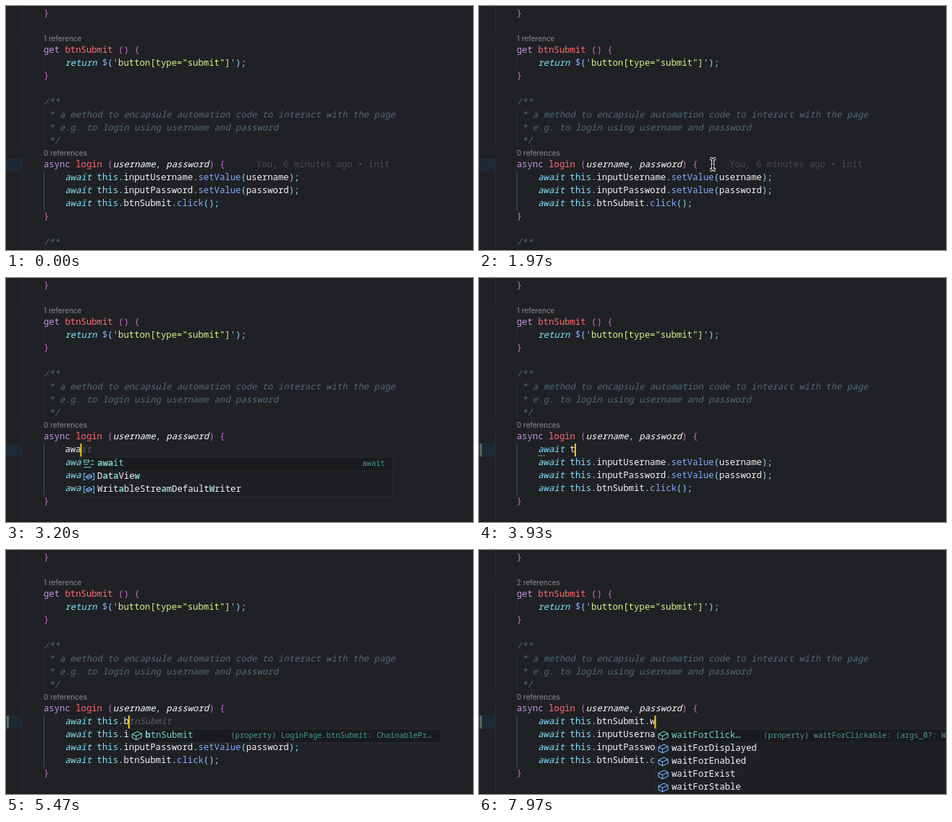
Animation of 645 by 339 pixels, one loop 8 s. Source, as an HTML page with a canvas:

```html
<!DOCTYPE html>
<html lang="en">
<head>
<meta charset="utf-8">
<title>Code editor</title>
<style>
  html, body { margin: 0; width: 100%; height: 100%; overflow: hidden; background: #202124; }
  canvas { display: block; width: 645px; height: 339px; }
</style>
</head>
<body>
<canvas id="stage"></canvas>
<script>
const W = 645, H = 339, LOOP = 8000;
const SIZE = 12.27, CHAR = SIZE * 0.6, LEFT = 52, LINE = 18;
const MONO = '"Noto Sans Mono", monospace';
const TEAL = '#7fcfd0', BLUE = '#75b5ff';

const canvas = document.getElementById('stage');
const ctx = canvas.getContext('2d');
const ratio = window.devicePixelRatio || 1;
canvas.width = W * ratio;
canvas.height = H * ratio;

// Token styles: colour and font style
const STYLES = {
  k: ['#c792ea', ''],
  n: ['#ff6b78', ''],
  b: ['#d06fd0', ''],
  c: ['#89ddff', ''],
  a: ['#80e4ff', 'italic'],
  f: ['#82aaff', ''],
  s: ['#d8f58c', ''],
  w: ['#f4f5f7', ''],
  p: ['#ffffff', 'italic'],
  m: ['#526b79', 'italic'],
  g: ['#5c6066', 'italic'],
  y: ['#494b4f', ''],
};

// Content of the new line from each moment on
const TYPED = [
  [2750, ''], [2900, 'a'], [3010, 'aw'], [3110, 'awa'], [3360, 'awai'],
  [3470, 'await'], [3620, 'await '], [3880, 'await t'], [3960, 'await th'],
  [4030, 'await thi'], [4080, 'await this'], [4130, 'await this.'],
  [4975, 'await this.b'], [5620, 'await this.btnSubmit'],
  [7050, 'await this.btnSubmit.'], [7750, 'await this.btnSubmit.w'],
];

const GHOSTS = {
  'awa': 'it', 'awai': 't', 'await this.': 'btnSubmit', 'await this.b': 'tnSubmit',
};

// Square brackets mark emphasised letters
const PROPERTY = '(property) LoginPage.btnSubmit: ChainablePr…';
const POPUPS = {
  'awa': { icons: 'kvv', detail: 'await', at: 388,
    items: ['[awa]it', 'D[a]t[a]Vie[w]', 'Writ[a]bleStre[a]mDefault[W]riter'] },
  'awai': { icons: 'k', detail: 'await', at: 388, items: ['[awai]t'] },
  'await this.': { icons: 'ooooo', detail: PROPERTY, at: 140,
    items: ['btnSubmit', 'inputPassword', 'inputUsername', 'login', 'open'] },
  'await this.b': { icons: 'o', detail: PROPERTY, at: 140, items: ['[b]tnSubmit'] },
  'await this.btnSubmit.': { icons: 'ooooo', at: 149,
    detail: '(property) addCommand: (name: string, func: any)',
    items: ['addCommand', 'addValue', 'clearValue', 'click', 'custom$'] },
  'await this.btnSubmit.w': { icons: 'ooooo', at: 149,
    detail: '(property) waitForClickable: (args_0?: WaitForOptions)',
    items: ['waitForClick…', 'waitForDisplayed', 'waitForEnabled', 'waitForExist', 'waitForStable'] },
};

const HEADER = [
  [10, 'b:}'],
  [61, 'k:get ', 'n:btnSubmit ', 'b:() {'],
  [79, 'a:    return ', 'f:$', "c:('", 's:button[type="submit"]', "c:');"],
  [97, 'b:}'],
  [133, 'm:/**'],
  [151, 'm: * a method to encapsule automation code to interact with the page'],
  [169, 'm: * e.g. to login using username and password'],
  [187, 'm: */'],
  [220, 'k:async ', 'n:login ', 'b:(', 'p:username', 'c:, ', 'p:password', 'b:) {'],
];
const BODY = [
  'await this.inputUsername.setValue(username);',
  'await this.inputPassword.setValue(password);',
  'await this.btnSubmit.click();',
];

function rect(color, x, y, w, h) {
  ctx.fillStyle = color;
  ctx.fillRect(x, y, w, h);
}

function text(string, x, middle, color, style = '', size = SIZE, weight = 500, family = MONO) {
  ctx.font = `${style} ${weight} ${size}px ${family}`;
  ctx.fillStyle = color;
  ctx.fillText(string, x, middle + size * 0.365);
}

function tokens(x, middle, parts) {
  for (const part of parts) {
    const [color, style] = STYLES[part[0]], string = part.slice(2);
    text(string, x, middle, color, style);
    x += string.length * CHAR;
  }
}

function highlight(code) {
  const words = code.match(/\w+|\W/g) || [];
  return words.map((word, i) => {
    if (word === 'await') return 'a:' + word;
    if (word === 'this' || /\W/.test(word)) return 'c:' + word;
    return (words[i + 1] === '(' ? 'f:' : 'w:') + word;
  });
}

function stroke(color, width, points, close) {
  ctx.strokeStyle = color;
  ctx.lineWidth = width;
  ctx.beginPath();
  points.forEach(([x, y]) => ctx.lineTo(x, y));
  if (close) ctx.closePath();
  ctx.stroke();
}

function icon(kind, x, y, color) {
  const line = (points, close) => stroke(color, 1.1, points.map(([a, b]) => [x + a, y + b]), close);
  if (kind === 'o') {
    line([[-6.5, -2], [1, -6], [6.5, -3], [6.5, 2.5], [-1, 6], [-6.5, 3]], true);
    line([[-6.5, -2], [-1, 0.5], [6.5, -3]]);
    line([[-1, 0.5], [-1, 6]]);
  } else if (kind === 'v') {
    for (const side of [-1, 1]) {
      line([[4.5 * side, -4.5], [7 * side, -4.5], [7 * side, 4.5], [4.5 * side, 4.5]]);
    }
    line([[-4, -0.5], [1, -3], [4, -1], [4, 1], [-1, 3.2], [-4, 1.5]], true);
    line([[-4, -0.5], [-1, 0.8], [4, -1]]);
  } else {
    line([[-7, -5], [0, -5], [0, -2], [-7, -2]], true);
    line([[2.5, -4], [7, -4]]);
    line([[-7, 1], [-1, 1]]);
    line([[2, 1], [7, 1]]);
    line([[-7, 5], [3, 5]]);
  }
}

function popup({ items, icons, detail, at }, x) {
  const top = 248.5, width = 431, height = items.length * LINE + 2;
  rect('#2c2e32', x, top, width, height);
  rect('#1f2023', x + 1, top + 1, width - 2, height - 2);
  rect('#191b1d', x + 1, top + 1, width - 2, LINE - 1);
  items.forEach((item, row) => {
    const y = 257 + row * LINE, color = row ? '#f4f5f7' : TEAL;
    icon(icons[row], x + 10.5, y + 1, row ? BLUE : TEAL);
    let column = x + 22;
    item.split(/[[\]]/).forEach((piece, i) => {
      const strong = i % 2;
      text(piece, column, y, strong ? TEAL : color, '', SIZE, strong ? 700 : 500);
      column += piece.length * CHAR;
    });
  });
  text(detail, x + at, 257, '#4f9899', '', 10.5, 400);
}

function pointer(t) {
  if (t < 300 || t >= 2750) return;
  const k = 1 - (1 - Math.min(1, (t - 300) / 500)) ** 3;
  const x = 440 - 117 * k, y = 345 - 125 * k;
  for (const [color, width] of [['#f2f2f2', 4], ['#111', 1.5]]) {
    for (const side of [-1, 1]) {
      stroke(color, width, [[x + 4 * side, y - 8], [x + 1.5 * side, y - 7.5], [x, y - 6],
        [x, y + 6], [x + 1.5 * side, y + 7.5], [x + 4 * side, y + 8]]);
    }
    stroke(color, width, [[x - 2.5, y + 2.5], [x + 2.5, y + 2.5]]);
  }
}

function draw(t) {
  const step = TYPED.findLast(([time]) => t >= time);
  const typed = step ? step[1] : '';
  const shift = step ? LINE : 0;

  rect('#202124', 0, 0, W, H);
  rect('#1f2933', 0, 212 + shift, 22, LINE);
  if (t >= 3500) rect('#53695a', 1, 230, 3, LINE);

  // Indent guides pause at the usage labels
  for (const [y, h] of [[0, 36], [54, 142], [212, 125]]) rect('#2c2e31', 22, y, 1, h);
  rect('#2c2e31', 52, 70, 1, LINE);
  rect('#2c2e31', 52, 142, 1, 54);
  rect('#3b555e', 52, 230, 1, 54 + shift);

  const label = (string, y) => text(string, LEFT, y, '#8b8d91', '', 10, 400, 'Inter, sans-serif');
  label(t < 6200 ? '1 reference' : '2 references', 45);
  label('0 references', 204);

  for (const [y, ...parts] of HEADER) tokens(LEFT, y, parts);
  const indent = LEFT + 4 * CHAR;
  BODY.forEach((code, i) => tokens(indent, 238 + shift + i * LINE, highlight(code)));
  tokens(LEFT, 292 + shift, ['b:}']);
  tokens(LEFT, 328 + shift, ['m:/**']);

  const cursor = indent + typed.length * CHAR;
  if (step) {
    tokens(indent, 238, highlight(typed));
    if (GHOSTS[typed]) tokens(cursor, 238, ['g:' + GHOSTS[typed]]);
    if (t >= 3700 && t < 4130) {
      for (let i = 0; i < 3; i++) rect('#a0a4a8', 82 + i * 3.5, 246, 1.5, 1.5);
    }
    if (POPUPS[typed]) popup(POPUPS[typed], cursor + 0.5);
  } else {
    tokens(346, 220, ['y:You, 6 minutes ago • init']);
  }

  const idle = t - (step ? step[0] : 2400);
  if (idle >= 0 && idle % 1000 < 500) {
    rect('#ffcc00', step ? cursor - 1 : LEFT + 34 * CHAR, 212 + shift, 2, LINE);
  }
  rect('#241b22', 0, 337, W, 2);
  pointer(t);
}

const start = performance.now();
function tick() {
  ctx.setTransform(ratio, 0, 0, ratio, 0, 0);
  draw((performance.now() - start) % LOOP);
  requestAnimationFrame(tick);
}
tick();
</script>
</body>
</html>
```
